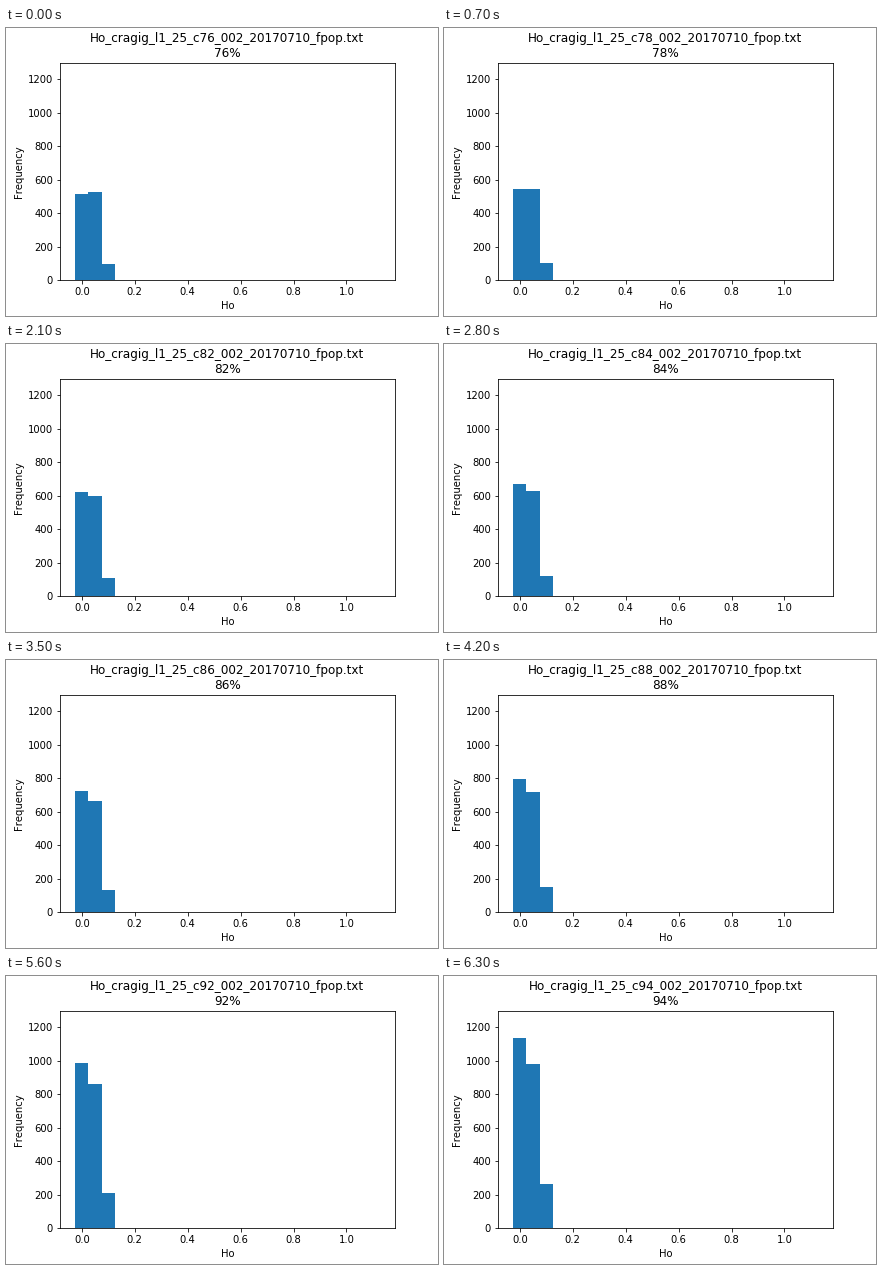
A matplotlib script for the animation above (7 s loop, 432 by 288 pixels).

```python
import math

import matplotlib.pyplot as plt
from matplotlib.animation import FuncAnimation

plt.rcParams["font.family"] = "DejaVu Sans"
plt.rcParams["text.kerning_factor"] = 6

START, STEP, FRAMES = 76, 2, 10
BIN = 0.05
MARGIN = 0.0575

# Each bin grows as a quadratic in the log of the shrinking remainder.
GROWTH = [(514, 358, 65), (526, 217, 80), (96, 32, 63)]


def bin_counts(level):
    x = math.log((100 - START) / (100 - level))
    return [a + b * x + c * x * x for a, b, c in GROWTH]


fig, ax = plt.subplots(figsize=(6, 4), dpi=72, facecolor="white")
fig.subplots_adjust(left=0.125, right=0.9, bottom=0.125, top=0.88)
ax.set_xlim(-BIN / 2 - MARGIN, 1.125 + MARGIN)
ax.set_ylim(0, 1300)
ax.set_xticks([0.2 * i for i in range(6)])
ax.set_yticks(range(0, 1300, 200))
ax.set_xlabel("Ho")
ax.set_ylabel("Frequency")
title = ax.set_title("")
bars = ax.bar([i * BIN for i in range(3)], [0] * 3, width=BIN, color="C0")


def draw(i):
    level = START + STEP * i
    for bar, count in zip(bars, bin_counts(level)):
        bar.set_height(count)
    title.set_text(f"Ho_cragig_l1_25_c{level}_002_20170710_fpop.txt\n{level}%")
    return [title, *bars]


anim = FuncAnimation(fig, draw, frames=FRAMES, interval=700,
                     repeat=True, repeat_delay=0, blit=False)
plt.show()
```
